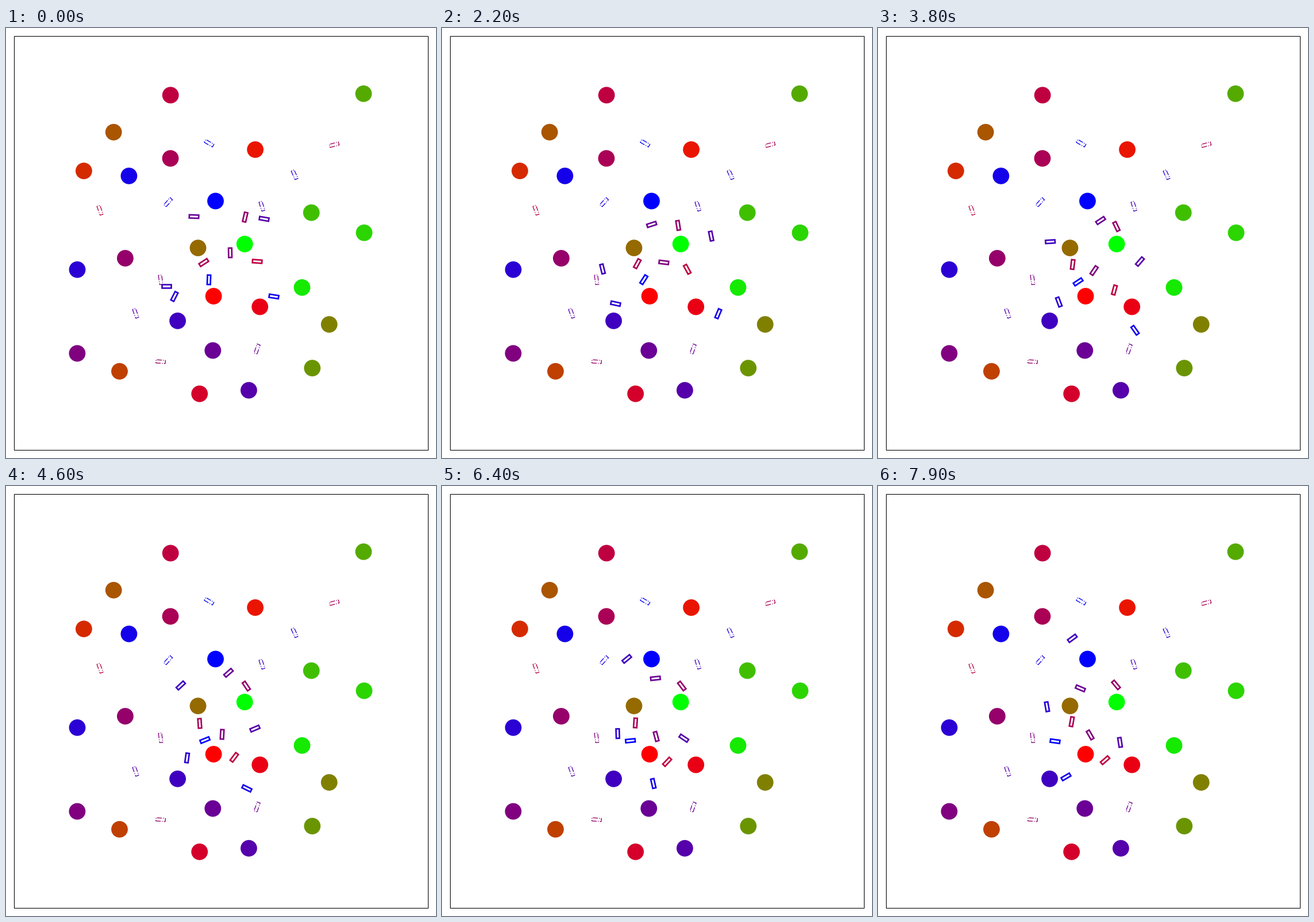
A matplotlib script that plays this animation: 748 px wide and 748 px high, repeating every 8000 ms.

```python
import numpy as np
import matplotlib.pyplot as plt
from matplotlib.animation import FuncAnimation
from matplotlib.patches import Circle, Rectangle

SIZE, DPI = 748, 96
FRAMES, INTERVAL = 80, 100
LONG, SHORT = 16.4, 5.6
FIRST_ROBOT = 15  # colour index of the first robot


def hue(k):
    """Green to red to blue in 24 even steps."""
    u = k / 12
    return (u, 1 - u, 0) if u <= 1 else (2 - u, 0, u - 1)


# Disc centres in pixels from the top left, in colour order
DISCS = [
    (415.2, 375.8), (515, 451.4), (623, 356.2), (531.2, 321.2), (622, 114.3),
    (532.8, 591.6), (562.2, 515.6), (334, 382.6), (187.2, 181.2), (197.5, 597.2),
    (135.4, 248.6), (433.6, 211.5), (361.1, 466.5), (441.7, 485), (336.7, 636.3),
    (286.2, 116.8), (286, 226.8), (207.4, 400.5), (123.9, 566), (359.8, 561),
    (422.4, 630.2), (298.6, 509.4), (124, 420.3), (213.9, 257.3), (364.5, 301),
]

# Goal poses: x, y, angle
GOALS = [
    (163.5, 317, -70), (571, 203, 15), (269, 580.4, -4), (269, 438, -82),
    (436.8, 558.3, 71), (225.5, 496.3, -70), (445.2, 310, -72),
    (502, 255.2, -65), (282, 303, 48), (353.3, 200.5, -30),
]

# Each robot drives through five points and turns through three headings
STOPS = np.array([0.1, 1.1, 3.1, 4.6, 7.9])
TURNS = STOPS[[0, 3, 4]]
ROBOTS = [
    ([(437, 406), (428, 403), (423, 440), (397, 472), (395, 477)], (-4, -127, -139)),
    ([(344, 408), (340, 410), (340, 410), (337, 413), (337, 410)], (33, 94, 80)),
    ([(416, 329), (412, 341), (412, 343), (418, 348), (414, 346)], (77, 124, 130)),
    ([(390, 391), (395, 402), (377, 413), (376, 432), (369, 433)], (91, 267, 300)),
    ([(327, 328), (339, 334), (383, 343), (387, 325), (352, 352)], (-2, 41, -23)),
    ([(449, 332), (453, 334), (472, 390), (433, 422), (421, 446)], (-10, -157, -261)),
    ([(279, 449), (266, 443), (295, 393), (304, 347), (338, 265)], (0, 223, 216)),
    ([(293, 467), (291, 478), (312, 477), (315, 473), (294, 384)], (63, -98, -80)),
    ([(466, 467), (480, 468), (468, 521), (419, 526), (327, 506)], (-9, 154, 390)),
    ([(353, 438), (353, 435), (349, 441), (346, 442), (308, 444)], (88, 22, -8)),
]


def glide(points, t):
    """Smooth curve through the stops."""
    points = np.array(points, float)
    slope = np.gradient(points, STOPS, axis=0)
    i = min(np.searchsorted(STOPS, t, side="right"), len(STOPS) - 1) - 1
    span = STOPS[i + 1] - STOPS[i]
    u = (t - STOPS[i]) / span
    step = points[i + 1] - points[i]
    bend = slope[i] * u * (1 - u) ** 2 - slope[i + 1] * u * u * (1 - u)
    return points[i] + step * u * u * (3 - 2 * u) + span * bend


def place(box, x, y, angle):
    box.set_xy((x - LONG / 2, SIZE - y - SHORT / 2))
    box.set_angle(angle)


def add_box(k, style, width, z):
    box = Rectangle((0, 0), LONG, SHORT, rotation_point="center", fill=False,
                    edgecolor=hue(k), linestyle=style, linewidth=width, zorder=z)
    return ax.add_patch(box)


fig = plt.figure(figsize=(SIZE / DPI, SIZE / DPI), dpi=DPI, facecolor="white")
ax = fig.add_axes([0, 0, 1, 1])
ax.set(xlim=(0, SIZE), ylim=(0, SIZE))
ax.axis("off")
ax.add_patch(Rectangle((14.2, 13.8), 720, 720, fill=False,
                       edgecolor="black", linewidth=0.8))

for k, (x, y) in enumerate(DISCS):
    ax.add_patch(Circle((x, SIZE - y), 14.4, color=hue(k), linewidth=0, zorder=2))

for k, pose in enumerate(GOALS, FIRST_ROBOT):
    place(add_box(k, "-.", 1, 3), *pose)

boxes = [add_box(FIRST_ROBOT + n, "-", 2, 4) for n in range(len(ROBOTS))]


def update(frame):
    t = max(frame * INTERVAL / 1000, STOPS[0])
    for box, (points, angles) in zip(boxes, ROBOTS):
        place(box, *glide(points, t), np.interp(t, TURNS, angles))
    return boxes


anim = FuncAnimation(fig, update, frames=FRAMES, interval=INTERVAL,
                     init_func=lambda: update(0), repeat=True, repeat_delay=0)
plt.show()
```
